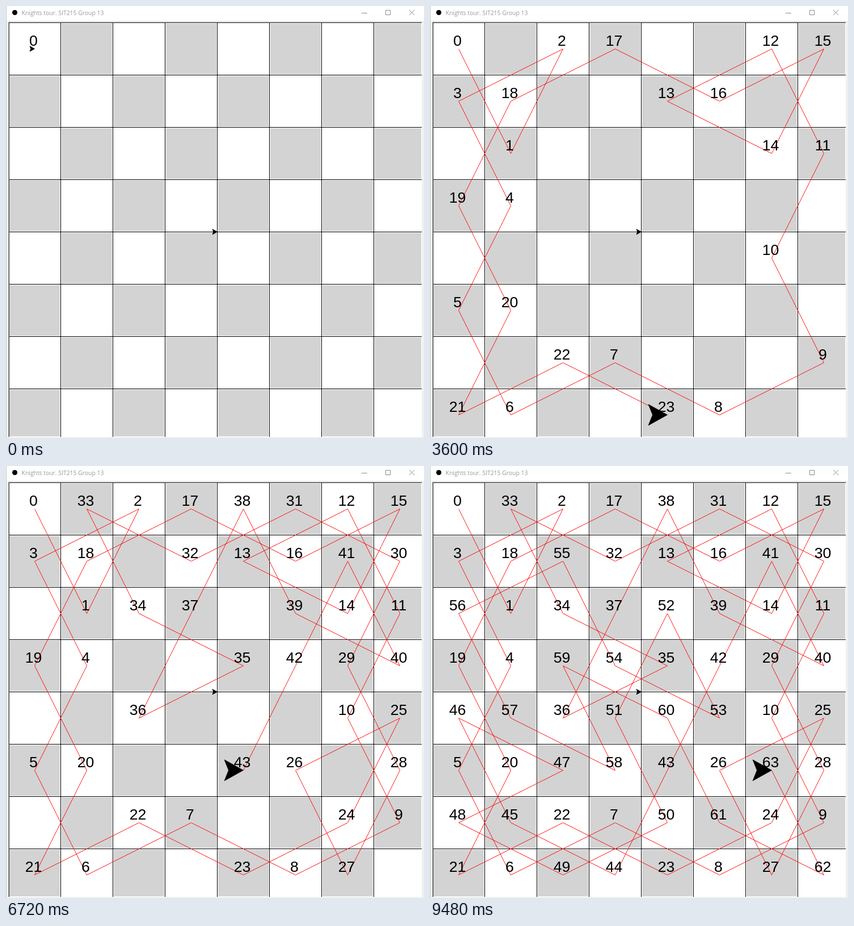
Animation of 737 by 760 pixels, one loop 9600 ms. Source, as an HTML page:

```html
<!DOCTYPE html>
<html lang="en">
<head>
<meta charset="utf-8">
<title>Knights tour</title>
<style>
  html, body { margin: 0; width: 100%; height: 100%; overflow: hidden; background: #f0f0f0; }
  svg { display: block; }
  .title { font: 10.4px "Open Sans", "Noto Sans", sans-serif; fill: #999; }
  .number { font: 26.67px "Liberation Sans", Arial, sans-serif; text-anchor: middle; }
  .buttons { fill: none; stroke: #8c8c8c; }
  .arrow { stroke: #000; stroke-width: .9; }
  .trail { fill: none; stroke: #f00; stroke-width: .9; }
  .crisp { shape-rendering: crispEdges; }
</style>
</head>
<body>
<svg id="stage" width="737" height="760" viewBox="0 0 737 760">
  <rect width="737" height="760" fill="#f0f0f0"/>
  <rect width="737" height="26" fill="#fff"/>
  <rect width="1" height="760" fill="#c8c8c8"/>
  <circle cx="15.5" cy="11.5" r="4.5"/>
  <text class="title" x="27.5" y="16">Knights tour. SIT215 Group 13</text>
  <g class="buttons">
    <path class="crisp" d="M627 12.5h10M669.5 7.5h8v8h-8z"/>
    <path d="M711 7l9 9M720 7l-9 9"/>
  </g>
  <rect class="crisp" x="4" y="28" width="729" height="730" fill="#a0a0a0"/>
  <rect class="crisp" x="5" y="29" width="728" height="729" fill="#404040"/>
  <rect class="crisp" x="6" y="30" width="727" height="728" fill="#fff"/>
  <g id="board" class="crisp"></g>
  <path id="trail" class="trail"/>
  <g id="numbers"></g>
  <g id="arrows"></g>
</svg>
<script>
const LOOP = 9600, FIRST_HOLD = 240, STEP = 120;
const SIZE = 8, CELL = 92;

const byId = id => document.getElementById(id);

function add(parent, tag, attrs, text) {
  const el = document.createElementNS("http://www.w3.org/2000/svg", tag);
  for (const key in attrs) el.setAttribute(key, attrs[key]);
  if (text !== undefined) el.textContent = text;
  parent.append(el);
  return el;
}

function arrowPath(x, y, scale) {
  const at = (dx, dy) => `${x + dx * scale} ${y + dy * scale}`;
  return `M${at(0, 0)}L${at(-9, -5)}L${at(-7, 0)}L${at(-9, 5)}Z`;
}

// Warnsdorff's rule: always jump to the free square with the fewest onward moves.
function knightsTour() {
  const jumps = [];
  for (const tall of [2, 1])
    for (const right of [1, -1])
      for (const down of [1, -1])
        jumps.push([down * tall, right * (3 - tall)]);

  const visited = new Set();
  const key = (r, c) => r * SIZE + c;
  const isFree = ([r, c]) =>
    r >= 0 && c >= 0 && r < SIZE && c < SIZE && !visited.has(key(r, c));
  const moves = ([r, c]) => jumps.map(([dr, dc]) => [r + dr, c + dc]).filter(isFree);

  const tour = [];
  let square = [0, 0];
  while (square) {
    visited.add(key(...square));
    tour.push(square);
    // The sort is stable, so ties keep the order of the jumps.
    square = moves(square).sort((a, b) => moves(a).length - moves(b).length)[0];
  }
  return tour;
}

const tour = knightsTour().map(([r, c]) => ({ x: 50.5 + CELL * c, y: 75.5 + CELL * r }));

for (let r = 0; r < SIZE; r++) {
  for (let c = 0; c < SIZE; c++) {
    if ((r + c) % 2 === 0) continue;
    const x = 6 + CELL * c, y = 31 + CELL * r;
    add(byId("board"), "rect", {
      x, y, width: Math.min(CELL - 3, 732 - x), height: Math.min(CELL - 3, 757 - y), fill: "#d3d3d3"
    });
  }
}

for (let i = 1; i < SIZE; i++) {
  add(byId("board"), "path", {
    d: `M${4.5 + CELL * i} 30V758M6 ${29.5 + CELL * i}H733`, stroke: "#000"
  });
}

const labels = tour.map((p, n) =>
  add(byId("numbers"), "text", { class: "number", x: p.x - 2, y: p.y - 5.5 }, n));

add(byId("arrows"), "path", { class: "arrow", d: arrowPath(372.3, 397.3, .92) });
const knight = add(byId("arrows"), "path", { class: "arrow" });

// Ticks so far on which the arrow lagged behind its line; rarer towards the end.
const lags = tick => Math.max(0, Math.floor(Math.min((3 * tick - 6) / 13, (tick + 76) / 10)));

let shownTick = -1;

function render(time) {
  const t = time % LOOP;
  const tick = t < FIRST_HOLD ? 0 : Math.floor((t - FIRST_HOLD) / STEP) + 1;
  if (tick === shownTick) return;
  shownTick = tick;

  const arrowAt = tick - lags(tick);
  const drawn = tick - lags(tick - 1);
  const { x, y } = tour[arrowAt];

  knight.setAttribute("d", arrowPath(x - .2, y - .2, tick ? 3.68 : .92));
  byId("trail").setAttribute("d",
    "M" + tour.slice(0, drawn + 1).map(p => `${p.x} ${p.y}`).join("L"));
  labels.forEach((el, n) => el.setAttribute("visibility", n <= drawn ? "visible" : "hidden"));
}

const start = performance.now();
function loop() {
  render(performance.now() - start);
  requestAnimationFrame(loop);
}
loop();
</script>
</body>
</html>
```
